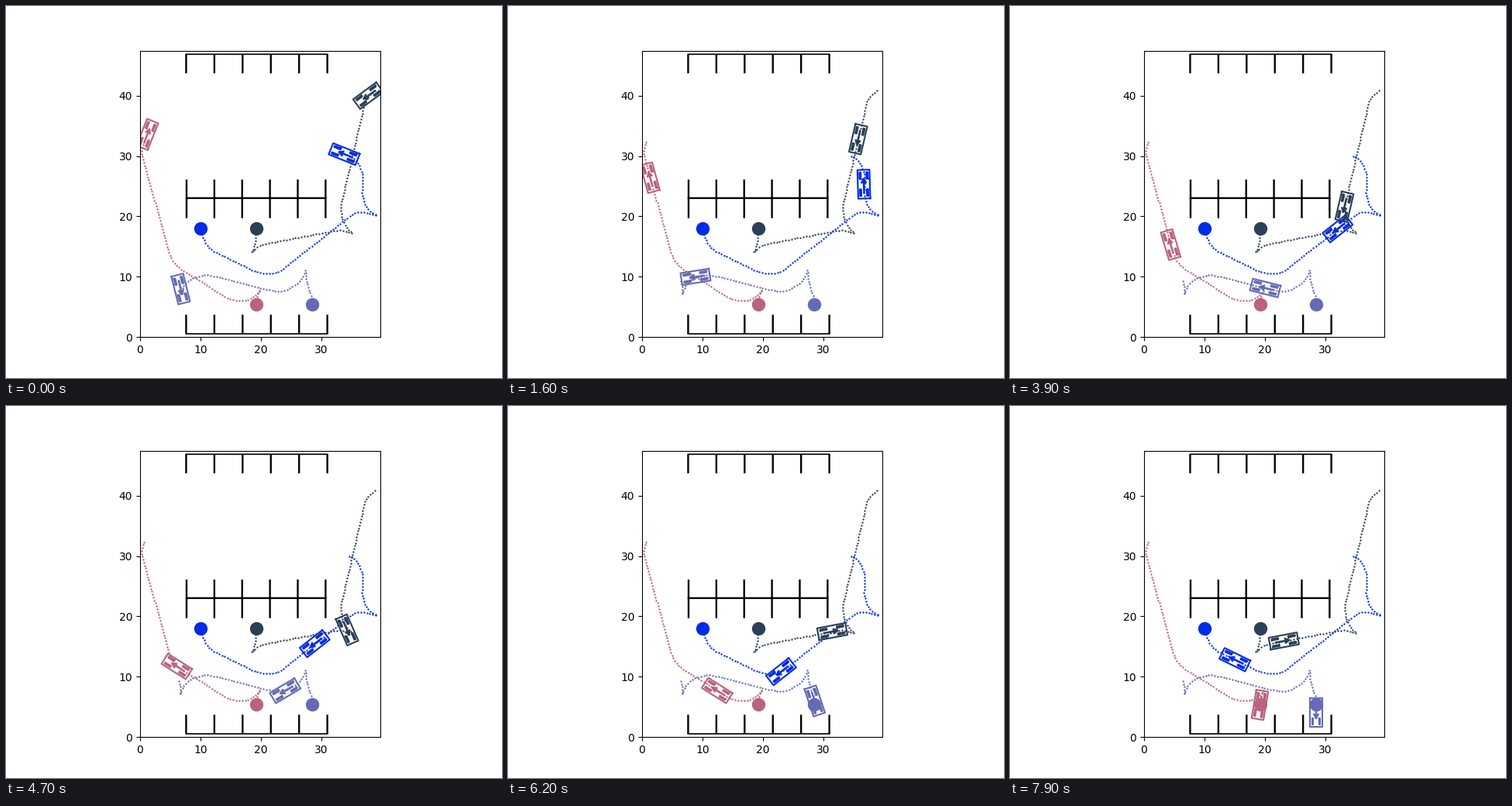
Write a matplotlib script that moves like this. It is 640 px wide and 480 px high and loops after 8000 ms.

```python
import numpy as np
import matplotlib.pyplot as plt
from matplotlib.animation import FuncAnimation

FRAMES, INTERVAL = 80, 100
STEP = 0.5                      # metres driven per frame
CUT = 2.0                       # how far a corner is rounded off

# car geometry, measured from the rear axle
WHEELBASE, FRONT, REAR, WIDTH = 2.8, 3.75, 1.0, 2.0
WHEEL_R, WHEEL_W, TRACK = 0.55, 0.22, 1.15
ARROW = 0.8 * WHEELBASE
GAP = (np.nan, np.nan)

# colour, first gear and corner points of the route; the last one is the goal
CARS = [
    ("#002be6", 1, [(35.1, 29.8), (34.6, 30), (35.8, 29.4), (37, 26.9),
                    (36.7, 23.3), (37.6, 21.2), (39.2, 20.1), (37.5, 20.7),
                    (35.6, 20.7), (22.6, 10.5), (19.8, 10.5), (11.6, 14.5),
                    (10.5, 16.1), (10, 17.95)]),
    ("#2b3f57", 1, [(38.9, 40.8), (37.4, 39.7), (33.1, 21.2), (33.8, 18.6),
                    (35.2, 17.2), (33.2, 17.8), (19.9, 15.3), (18.4, 14),
                    (19.1, 15.4), (19.2, 18)]),
    ("#b9647c", -1, [(0.7, 32.3), (0.1, 30.8), (5.3, 12.2), (15, 6.1),
                     (17.7, 6), (19, 6.8), (19.9, 7.9), (19.5, 7.2),
                     (19.2, 5.4)]),
    ("#646bb4", 1, [(6.4, 9.3), (6.7, 8.1), (6.6, 7), (7.3, 8.8), (8.6, 9.8),
                    (11, 10.4), (23.4, 7.3), (26.1, 8.9), (27.1, 10.2),
                    (27.4, 11.1), (27.5, 9.3), (28.5, 6.3), (28.5, 5.4)]),
]


def rounded(points):
    """Polyline with soft corners; sharp reversals stay sharp."""
    pts = np.array(points, float)
    t = np.linspace(0, 1, 20)[:, None]
    path = [pts[:1]]
    for a, b, c in zip(pts, pts[1:], pts[2:]):
        u, v = a - b, c - b
        if u @ v > 0:
            path.append(b[None])
            continue
        lu, lv = np.hypot(*u), np.hypot(*v)
        cut = min(CUT, lu / 2, lv / 2)
        p, q = b + u * cut / lu, b + v * cut / lv
        path.append((1 - t)**2 * p + 2 * t * (1 - t) * b + t**2 * q)
    path = np.vstack(path + [pts[-1:]])
    moved = np.hypot(*np.diff(path, axis=0).T) > 1e-9
    return path[np.r_[True, moved]]


def drive(points, gear):
    """Poses (x, y, heading) at constant speed; each reversal flips the gear."""
    path = rounded(points)
    seg = np.diff(path, axis=0)
    dist = np.r_[0, np.cumsum(np.hypot(*seg.T))]
    flips = np.where((seg[1:] * seg[:-1]).sum(axis=1) < 0, -1, 1)
    seg *= gear * np.cumprod(np.r_[1, flips])[:, None]
    s = np.r_[np.arange(0, dist[-1], STEP), dist[-1]]
    i = np.clip(np.searchsorted(dist, s, "right") - 1, 0, len(seg) - 1)
    return np.column_stack([np.interp(s, dist, path[:, 0]),
                            np.interp(s, dist, path[:, 1]),
                            np.arctan2(seg[i, 1], seg[i, 0])])


def box(x0, x1, y0, y1):
    return np.array([(x0, y0), (x1, y0), (x1, y1), (x0, y1), (x0, y0), GAP])


def wheel(x, y):
    return box(x - WHEEL_R, x + WHEEL_R, y - WHEEL_W / 2, y + WHEEL_W / 2)


def place(shape, pose):
    x, y, a = pose
    c, s = np.cos(a), np.sin(a)
    return x + c * shape[:, 0] - s * shape[:, 1], y + s * shape[:, 0] + c * shape[:, 1]


HX, HY = 0.3 * ARROW * np.cos(np.pi / 6), 0.3 * ARROW * np.sin(np.pi / 6)
CAR = np.vstack([box(-REAR, FRONT, -WIDTH / 2, WIDTH / 2)]
                + [wheel(x, y) for x in (0, WHEELBASE)
                   for y in (-TRACK / 2, TRACK / 2)])
POINTER = np.array([(0, 0), (ARROW, 0), GAP,
                    (ARROW - HX, HY), (ARROW, 0), (ARROW - HX, -HY)])

fig, ax = plt.subplots(figsize=(6.4, 4.8), dpi=100)
ax.set_aspect("equal")
ax.set_xlim(0, 39.8)
ax.set_ylim(0, 47.45)
ax.set_xticks(range(0, 40, 10))
ax.set_yticks(range(0, 50, 10))

# parking rows: left, right, spine height, stall lines from and to, spine width
for x0, x1, spine, lo, hi, lw in [(7.63, 31.02, 46.85, 43.7, 46.85, 1.2),
                                  (7.7, 30.73, 23.02, 19.7, 26.1, 1.7),
                                  (7.63, 31.02, 0.54, 0.54, 3.7, 1.2)]:
    ax.plot([x0, x1], [spine, spine], "k", lw=lw, snap=False)
    ax.vlines(np.linspace(x0, x1, 6), lo, hi, "k", lw=1.7, snap=False)

fleet = []
for color, gear, points in CARS:
    poses = drive(points, gear)
    ax.plot(*points[-1], "o", color=color, ms=11.5)
    ax.plot(poses[:, 0], poses[:, 1], "o", color=color, ms=1.7, mew=0)
    body, = ax.plot([], [], color=color, lw=1.5)
    arrow, = ax.plot([], [], color=color, lw=1.8)
    fleet.append((poses, body, arrow))


def update(frame):
    step = max(frame - 1, 0)
    artists = []
    for poses, body, arrow in fleet:
        pose = poses[min(step, len(poses) - 1)]
        body.set_data(*place(CAR, pose))
        arrow.set_data(*place(POINTER, pose))
        artists += [body, arrow]
    return artists


anim = FuncAnimation(fig, update, frames=FRAMES, interval=INTERVAL,
                     init_func=lambda: update(0), repeat=True)
plt.show()
```
